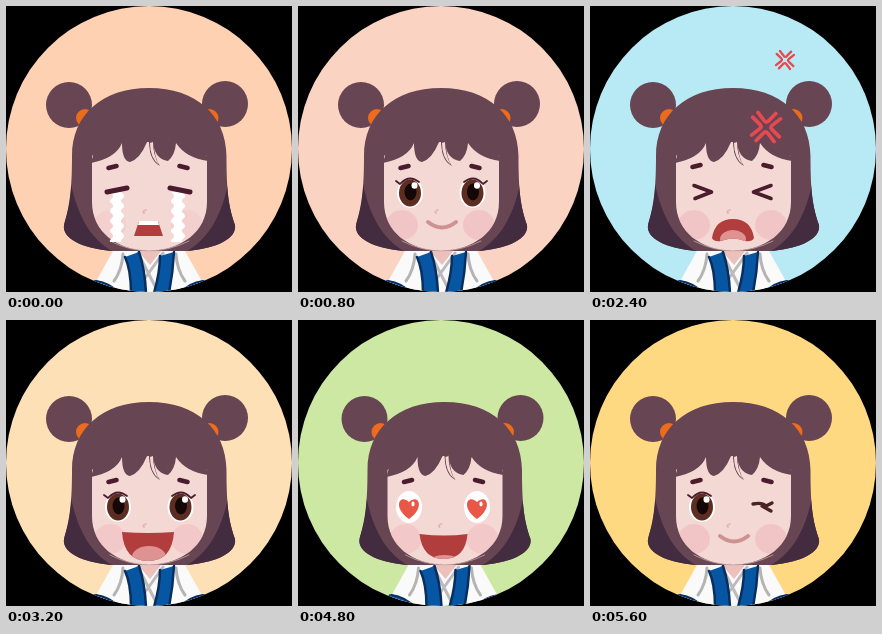
Animation, 286 px wide and 286 px high, one loop 6400 ms. Source, as an HTML page with a canvas:

```html
<!DOCTYPE html>
<html lang="en">
<head>
<meta charset="utf-8">
<title>Moods</title>
<style>
html, body { margin: 0; width: 100%; height: 100%; overflow: hidden; background: #000; }
canvas { display: block; width: 286px; height: 286px; }
</style>
</head>
<body>
<canvas id="stage" width="286" height="286"></canvas>
<script>
const ctx = document.getElementById('stage').getContext('2d');
const HAIR = '#674552', SHADE = '#432b40', INK = '#4b1c2d', SKIN = '#f4d8d4',
      RED = '#b23d3d', TONGUE = '#df9292', BLUE = '#0756a4', NAVY = '#092e5c';

function fill(path, color) {
  ctx.fillStyle = color;
  ctx.fill(new Path2D(path));
}

function line(path, color = INK, width = 4) {
  ctx.strokeStyle = color;
  ctx.lineWidth = width;
  ctx.lineCap = ctx.lineJoin = 'round';
  ctx.stroke(new Path2D(path));
}

function oval(x, y, rx, ry, color) {
  ctx.fillStyle = color;
  ctx.beginPath();
  ctx.ellipse(x, y, rx, ry, 0, 0, Math.PI * 2);
  ctx.fill();
}

function clipped(path, draw) {
  ctx.save();
  ctx.clip(new Path2D(path));
  draw();
  ctx.restore();
}

function mirrored(draw, axis = 143.5) {
  draw();
  ctx.save();
  ctx.translate(axis * 2, 0);
  ctx.scale(-1, 1);
  draw();
  ctx.restore();
}

function backHair() {
  const outline = 'M143 82C96 82 66 109 66 150C66 188 63 201 58 219C56 232 75 242 105 245H182C212 242 231 232 229 219C223 201 220.5 188 220.5 150C220 109 190 82 143 82Z';
  oval(63, 99, 23, 23, HAIR);
  oval(219, 98, 23, 23, HAIR);
  oval(79, 112, 9, 9, '#ed6b1c');
  oval(203.5, 112, 9, 9, '#ed6b1c');
  fill(outline, HAIR);
  clipped(outline, () => mirrored(() =>
    fill('M65 178C64 199 61 211 56 221V245H106C85 233 72 211 65 178Z', SHADE)));
}

function body() {
  fill('M107 245L88 279V286H198V279L179 245Z', '#fafafa');
  mirrored(() => {
    line('M117 248Q116 264 108 275', '#b5b3b4', 3);
    fill('M88 274Q103 276 113 287H80Z', BLUE);
    line('M90 275Q104 277 113 287', NAVY, 2);
  });
  fill('M131 244H156L144 259Z', '#ecc0bb');
  line('M157 247L137 275M132 247L151 284', '#bcbabb', 3);
  fill('M119 251L133 246Q139 264 140 287H125Q125 264 119 251Z', BLUE);
  fill('M154 250L168 246Q167 266 163 287H148Q154 266 154 250Z', BLUE);
  line('M133 246Q139 264 140 287M119 251Q125 264 125 287M154 250Q154 266 148 287M168 246Q167 266 163 287', NAVY, 2.5);
}

function face(blush) {
  const outline = 'M86 150V196C86 226 111 244 143 245C175 244 201 226 201 196V150L170 125H115Z';
  fill(outline, SKIN);
  clipped(outline, () => {
    ctx.globalAlpha = blush;
    oval(104, 219, 16, 15, '#efb3b8');
    oval(181, 219, 16, 15, '#efb3b8');
    ctx.globalAlpha = 1;
  });
  line('M104 235Q143 255 183 235', '#c9a5a8', .8);
  line('M140 204Q136 205 138 207', '#e8b3ae', 1.8);
}

function fringe() {
  fill('M85 157Q110 152 116 137Q116 155 124 156Q134 153 141 136L147 135Q148 153 162 155Q169 149 170 137Q180 152 202 155L191 109H98Z', HAIR);
  fill('M140 136Q144 132 148 136Q148 152 154 160Q144 155 143 138Z', HAIR);
  fill('M141 136Q142 145 144 148Q143 142 143 136ZM144 137Q144 152 153 159Q147 149 147 136Z', SKIN);
}

function brows(drop = 0) {
  line(`M102.5 ${162 + drop}L110.5 ${160 + drop}M173.5 ${160 + drop}L181.5 ${162 + drop}`, INK, 4.6);
}

function openEye(x) {
  oval(x, 187, 13, 15, '#fff');
  oval(x, 187, 11, 13.5, '#5d2d22');
  oval(x + .5, 186, 6, 8.5, '#140806');
  oval(x + 4.5, 179.5, 3, 3.3, '#fff');
}

function leftEye() {
  openEye(112);
  line('M98 175L102 178Q111 168 121 176', INK, 1.8);
}

function openEyes() {
  leftEye();
  openEye(174.5);
  line('M189 175L185 178Q176 168 166 176', INK, 1.8);
}

function heartEye(x) {
  oval(x, 187, 13, 16, '#fff');
  fill(`M${x} 199C${x - 17} 187 ${x - 9} 173 ${x} 182C${x + 9} 173 ${x + 17} 187 ${x} 199Z`, '#e95749');
  oval(x + 4, 184, 1.6, 2.4, '#fff');
}

// Both edges of a tear follow the same wave.
function tears(x) {
  const wave = 'q3.5 2.5 3 5q-3.5 2.5 -3 5';
  const back = 'q-.5 -2.5 3 -5q.5 -2.5 -3 -5';
  fill(`M${x - 7} 186${wave.repeat(5)}h11${back.repeat(5)}Z`, '#fff');
}

function mouth(path, tongue) {
  fill(path, RED);
  clipped(path, () => oval(...tongue, TONGUE));
}

function anger(x, y, scale) {
  ctx.save();
  ctx.translate(x, y);
  ctx.rotate(.06);
  ctx.scale(scale, scale);
  for (let i = 0; i < 4; i++) {
    line('M-9 -14L-2 -6Q0 -4 2 -6L9 -14', '#e64950', 3.7);
    ctx.rotate(Math.PI / 2);
  }
  ctx.restore();
}

const smile = () => line('M130 216Q144 227 158 216', '#cf9293', 4);

function grin(teeth) {
  mouth('M116 212Q142 214 168 212Q166 241 142 241Q118 241 116 212Z', [143, 237, 17, 11]);
  if (teeth) fill('M119 212H165Q165 217 161 217H123Q119 217 119 212Z', '#fff');
}

const moods = [
  { bg: '#ffd1b3', blush: .25, draw() {
    tears(111);
    tears(172);
    line('M101 186Q111 184 121 182M164 182Q174 184 184 186', INK, 5);
    brows();
    mouth('M133 215H152L157 230H128Z', [143, 236, 10, 5]);
    fill('M133 215H152L153 219H132Z', '#fff');
  } },
  { bg: '#fbd3c2', blush: .5, draw() {
    openEyes(); brows(); smile();
  } },
  { bg: '#ffe7ad', blush: .35, draw() {
    openEyes(); brows(); grin(true);
  } },
  { bg: '#b8eaf5', blush: .5, draw() {
    line('M104 179.5L121.5 186L105 192.5M181 179.5L163.5 186L181 192.5', INK, 3.6);
    brows(-1);
    mouth('M122 232Q125 213 143 213Q161 213 164 232Q162 236 155 235Q143 230 131 235Q124 236 122 232Z', [143, 233, 13, 9]);
    anger(176, 121, 1);
    anger(195, 54, .62);
  } },
  { bg: '#fde0b5', blush: .45, draw() {
    openEyes(); brows(); grin();
  } },
  { bg: '#ffb6a5', blush: .55, draw() {
    line('M104 181L120 189L104 197M104 189H119M182 181L166 189L182 197M182 189H167', INK, 3.4);
    brows();
    mouth('M122 214H163Q162 235 143 235Q123 235 122 214Z', [143, 238, 4, 4]);
    fill('M122 214H163Q163 219 159 219H126Q122 219 122 214Z', '#fff');
    fill('M131 226Q143 223 155 226V235Q153 246 143 246Q132 246 131 235Z', TONGUE);
    line('M143 226V237', '#bd696b', 1.2);
  } },
  { bg: '#cce8a3', blush: .45, dx: 3.5, draw() {
    heartEye(107.5);
    heartEye(175.5);
    brows();
    mouth('M118 214Q143 217 166 214Q164 239 142 239Q121 239 118 214Z', [143, 242, 16, 7]);
  } },
  { bg: '#ffd981', blush: .5, draw() {
    leftEye();
    line('M163 184Q172 182 176 186L182 183M172 186L181 191', '#4a2420', 3.4);
    brows(); smile();
  } }
];

function render(now) {
  const mood = moods[Math.floor(now % 6400 / 800)];
  ctx.fillStyle = '#000';
  ctx.fillRect(0, 0, 286, 286);
  oval(143, 143, 143, 143, mood.bg);
  clipped('M0 143A143 143 0 0 0 286 143A143 143 0 0 0 0 143Z', () => {
    ctx.translate(mood.dx || 0, 0);
    body();
    backHair();
    face(mood.blush);
    fringe();
    mood.draw();
  });
}

const start = performance.now();
function tick() {
  render(performance.now() - start);
  requestAnimationFrame(tick);
}
tick();
</script>
</body>
</html>
```
